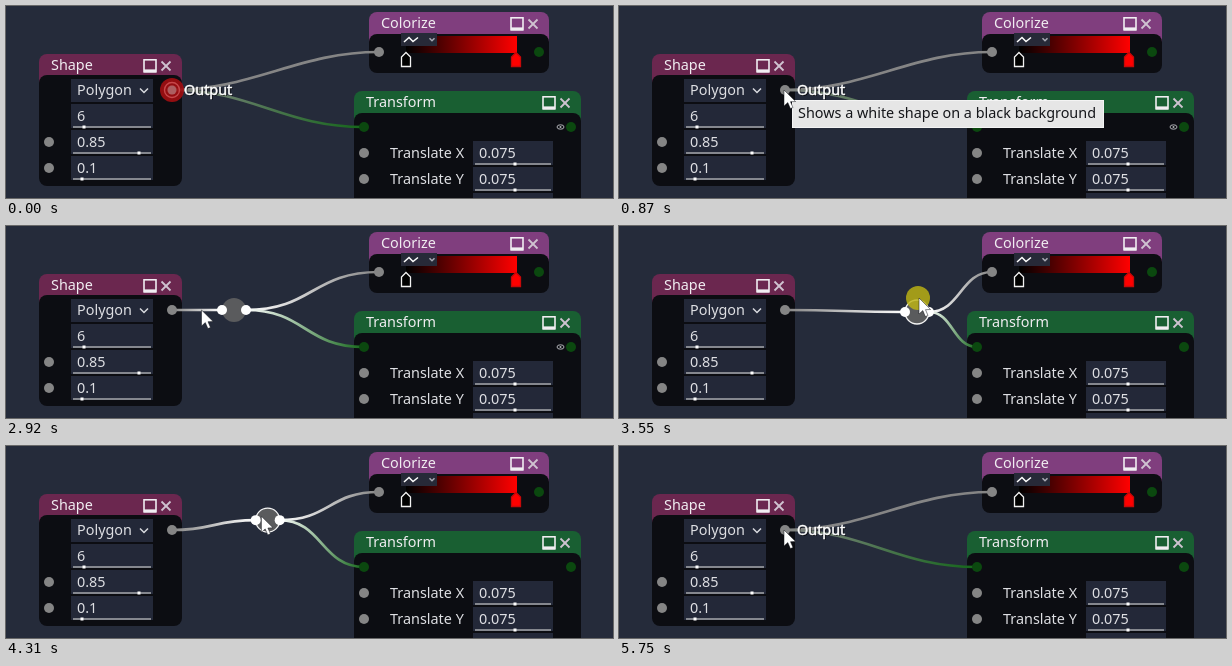
These frames come from a looping animation (607 px wide and 192 px high, 5950 ms). An HTML page with a canvas:

```html
<!DOCTYPE html>
<html lang="en">
<head>
<meta charset="utf-8">
<title>Node graph reroute</title>
<style>
html, body { margin: 0; width: 607px; height: 192px; overflow: hidden; background: #252b3a; }
canvas { display: block; }
</style>
</head>
<body>
<canvas id="stage" width="607" height="192"></canvas>
<script>
const ctx = document.getElementById('stage').getContext('2d');
const LOOP = 5950, STEP = 70;
const FONT = '14.4px "Noto Sans", "Open Sans", sans-serif';
const GREY = '#858585', GREEN = '#0b480f', LINK_GREEN = '#14661a', FIELD = '#232838';
const OUT = [166, 84], COLOR_IN = [373, 46], TRANS_IN = [358, 121];

// Pointer path: time, x, y
const PATH = [
  [2780, 165, 84], [3060, 226, 84], [3200, 229, 84], [3410, 285, 84],
  [3480, 298, 86], [3550, 300, 72], [3620, 292, 32], [3690, 262, 13],
  [3760, 226, 50], [3830, 218, 112], [3900, 231, 119], [3970, 258, 110],
  [4040, 272, 92], [4110, 268, 78], [4310, 250, 67], [4440, 250, 67],
  [5070, 168, 73], [5140, 166, 78], [5210, 165, 84]
];
const TIPS = [[210, 540], [870, 1660], [1990, 2850], [5680, 5750]];
const CLICKS = [[0, 140], [540, 680], [1660, 1790], [5680, 5750]];

const within = (t, spans) => spans.some(([a, b]) => t >= a && t < b);

function pointer(t) {
  if (t <= PATH[0][0]) return PATH[0].slice(1);
  for (let i = 1; i < PATH.length; i++) {
    const [t0, x0, y0] = PATH[i - 1], [t1, x1, y1] = PATH[i];
    if (t < t1) {
      const k = (t - t0) / (t1 - t0);
      return [x0 + (x1 - x0) * k, y0 + (y1 - y0) * k];
    }
  }
  return PATH[PATH.length - 1].slice(1);
}

function reroute(t) {
  if (t < 3200) return [228, 84];
  return t < 4440 ? pointer(t - STEP) : [250, 67];
}

function rect(x, y, w, h, fill) {
  ctx.fillStyle = fill;
  ctx.fillRect(x, y, w, h);
}

function panel(x, y, w, h, r, fill) {
  ctx.fillStyle = fill;
  ctx.beginPath();
  ctx.roundRect(x, y, w, h, r);
  ctx.fill();
}

function disc(x, y, r, fill) {
  ctx.fillStyle = fill;
  ctx.beginPath();
  ctx.arc(x, y, r, 0, Math.PI * 2);
  ctx.fill();
}

function text(s, x, y, fill = '#dedfe3') {
  ctx.fillStyle = fill;
  ctx.fillText(s, x, y);
}

function poly(points, fill, stroke, width = 1) {
  ctx.beginPath();
  points.forEach(([x, y]) => ctx.lineTo(x, y));
  if (fill) {
    ctx.closePath();
    ctx.fillStyle = fill;
    ctx.fill();
  }
  if (stroke) {
    ctx.strokeStyle = stroke;
    ctx.lineWidth = width;
    ctx.stroke();
  }
}

// The rounded body sits on a title colour that shows at its upper corners
function node(title, x, y, w, h, head, color) {
  panel(x, y, w, head + 10, [8, 8, 0, 0], color);
  panel(x, y + head, w, h - head, 8, '#0c0d12');
  text(title, x + 12, y + 16, '#f0edf1');

  const ix = x + w - 39, iy = y + 5;
  ctx.strokeStyle = '#f1eef2';
  ctx.lineWidth = 1.6;
  ctx.strokeRect(ix + 1, iy + 0.8, 12, 12);
  rect(ix + 1, iy + 10.4, 12, 3, '#f1eef2');
  const cx = x + w - 16, cy = y + 12;
  const cross = '#cfc3d0';
  poly([[cx - 4.5, cy - 4.5], [cx + 4.5, cy + 4.5]], null, cross, 1.8);
  poly([[cx + 4.5, cy - 4.5], [cx - 4.5, cy + 4.5]], null, cross, 1.8);
}

function slider(value, x, y, w, knob) {
  rect(x, y, w, 24, FIELD);
  rect(x + 2, y + 22, w - 4, 2, '#85888f');
  rect(knob - 1.5, y + 21.5, 3, 3, '#fff');
  text(value, x + 6, y + 17);
}

function chevron(x, y, r, color) {
  poly([[x - r, y - r / 2], [x, y + r / 2], [x + r, y - r / 2]], null, color, 1.5);
}

function shapeNode() {
  node('Shape', 33, 48, 143, 132, 21, '#6b274f');
  rect(65, 73, 82, 23, FIELD);
  text('Polygon', 71, 89);
  chevron(138, 84.5, 4, '#d8d9de');
  slider('6', 65, 98, 82, 78);
  slider('0.85', 65, 124, 82, 133);
  slider('0.1', 65, 150, 82, 76);
  disc(43, 136, 5, GREY);
  disc(43, 162, 5, GREY);
}

function marker(x, fill) {
  poly([[x, 46.5], [x + 4.5, 51], [x + 4.5, 60.5], [x - 4.5, 60.5], [x - 4.5, 51], [x, 46.5]],
    fill, fill === '#000' ? '#f2f2f2' : '#c80808', 1.3);
}

function colorizeNode() {
  node('Colorize', 363, 6, 180, 61, 22, '#803e7e');
  const ramp = ctx.createLinearGradient(400, 0, 511, 0);
  ramp.addColorStop(0, '#000');
  ramp.addColorStop(1, '#f00');
  rect(400, 30, 111, 17, ramp);
  rect(395, 27, 36, 13, '#272a38');
  poly([[398, 36], [403, 31.5], [407, 35.5], [412, 31.5]], null, '#fff', 1.5);
  chevron(426, 33.5, 2.5, '#a9abb4');
  marker(400, '#000');
  marker(510, '#f00');
  disc(533, 46, 5, GREEN);
}

function transformNode(eye) {
  node('Transform', 348, 85, 227, 120, 22, '#195f32');
  [['X', 135], ['Y', 161]].forEach(([axis, y]) => {
    text('Translate ' + axis, 384, y + 17);
    slider('0.075', 467, y, 80, 509);
    disc(358, y + 12, 5, GREY);
  });
  rect(467, 187, 80, 5, FIELD);
  disc(565, 121, 5, GREEN);
  if (eye) {
    ctx.strokeStyle = '#b0b1b6';
    ctx.lineWidth = 1;
    ctx.beginPath();
    ctx.ellipse(554.5, 121, 3.5, 2.2, 0, 0, Math.PI * 2);
    ctx.stroke();
    disc(554.5, 121, 1, '#b0b1b6');
  }
}

// White hexagon with a soft edge, shown inside the node
function preview() {
  const cx = 103.5, cy = 123.5, half = 52.5;
  rect(51, 71, 105, 105, '#000');
  for (let i = 1; i <= 12; i++) {
    const r = half * 0.85 * (1 - 0.1 * i / 12) / Math.cos(Math.PI / 6);
    const v = Math.round(255 * i / 12);
    const pts = Array.from({ length: 6 }, (_, k) => {
      const a = k * Math.PI / 3;
      return [cx + r * Math.cos(a), cy + r * Math.sin(a)];
    });
    poly(pts, `rgb(${v},${v},${v})`);
  }
}

function link([x0, y0], [x1, y1], from, to) {
  const bend = Math.min(80, Math.abs(x1 - x0) / 2);
  const g = ctx.createLinearGradient(x0, 0, x1, 0);
  g.addColorStop(0, from);
  g.addColorStop(1, to);
  ctx.strokeStyle = g;
  ctx.lineWidth = 2.7;
  ctx.beginPath();
  ctx.moveTo(x0, y0);
  ctx.bezierCurveTo(x0 + bend, y0, x1 - bend, y1, x1, y1);
  ctx.stroke();
}

function links(t, q) {
  if (t < 1660 || t >= 5680) {
    link(OUT, COLOR_IN, GREY, GREY);
    link(OUT, TRANS_IN, GREY, LINK_GREEN);
    return;
  }
  const [x, y] = reroute(q);
  link(OUT, [x - 12, y], GREY, '#fff');
  link([x + 12, y], COLOR_IN, '#fff', GREY);
  link([x + 12, y], TRANS_IN, '#fff', LINK_GREEN);
  disc(x, y, 12, '#5a5b5d');
  if (t >= 3060) {
    ctx.strokeStyle = '#f4f4f4';
    ctx.lineWidth = 1.3;
    ctx.stroke();
  }
  disc(x - 12, y, 5, '#fff');
  disc(x + 12, y, 5, '#fff');
}

function label() {
  text('Output', 179, 90, 'rgba(0,0,0,.7)');
  text('Output', 178, 89, '#fff');
  ctx.strokeStyle = '#fff';
  ctx.lineWidth = 0.5;
  ctx.strokeText('Output', 178, 89);
}

function tooltip() {
  rect(173, 94, 312, 28, '#f4f4f4');
  rect(174, 95, 310, 26, '#e6e6e6');
  text('Shows a white shape on a black background', 179, 112, '#15161a');
}

function redClick() {
  disc(166, 84, 12, 'rgba(160,14,17,.92)');
  ctx.strokeStyle = '#c8474a';
  ctx.lineWidth = 1.4;
  ctx.beginPath();
  ctx.arc(166, 84, 7.5, 0, Math.PI * 2);
  ctx.stroke();
  disc(166, 84, 4.5, '#ad5f61');
}

function arrow([x, y]) {
  const shape = [[0, 0], [0, 16], [3.8, 12.6], [6.4, 18.6], [9, 17.5], [6.5, 11.7], [11.6, 11.5], [0, 0]];
  poly(shape.map(([dx, dy]) => [x + dx, y + dy]), '#fff', 'rgba(15,17,24,.7)', 0.7);
}

function draw(t) {
  const base = t < 4400 ? 2850 : 4510;
  const q = base + Math.floor((t - base) / STEP) * STEP;
  const tip = pointer(q);

  ctx.font = FONT;
  ctx.lineCap = 'butt';
  rect(0, 0, 607, 192, '#252b3a');
  shapeNode();
  if (t >= 70 && t < 540) preview();
  colorizeNode();
  transformNode(t < 3060);
  links(t, q);
  disc(...OUT, 5, GREY);
  disc(...COLOR_IN, 5, GREY);
  disc(...TRANS_IN, 5, GREEN);

  if (within(t, CLICKS)) redClick();
  if (t < 2920 || t >= 5210) label();
  if (within(t, TIPS)) tooltip();
  if (t >= 3130 && t < 4310) disc(tip[0] - 1, tip[1], 12, 'rgba(190,180,18,.82)');
  if (t >= 70) arrow(tip);
}

const start = performance.now();
function tick() {
  draw((performance.now() - start) % LOOP);
  requestAnimationFrame(tick);
}
tick();
</script>
</body>
</html>
```
